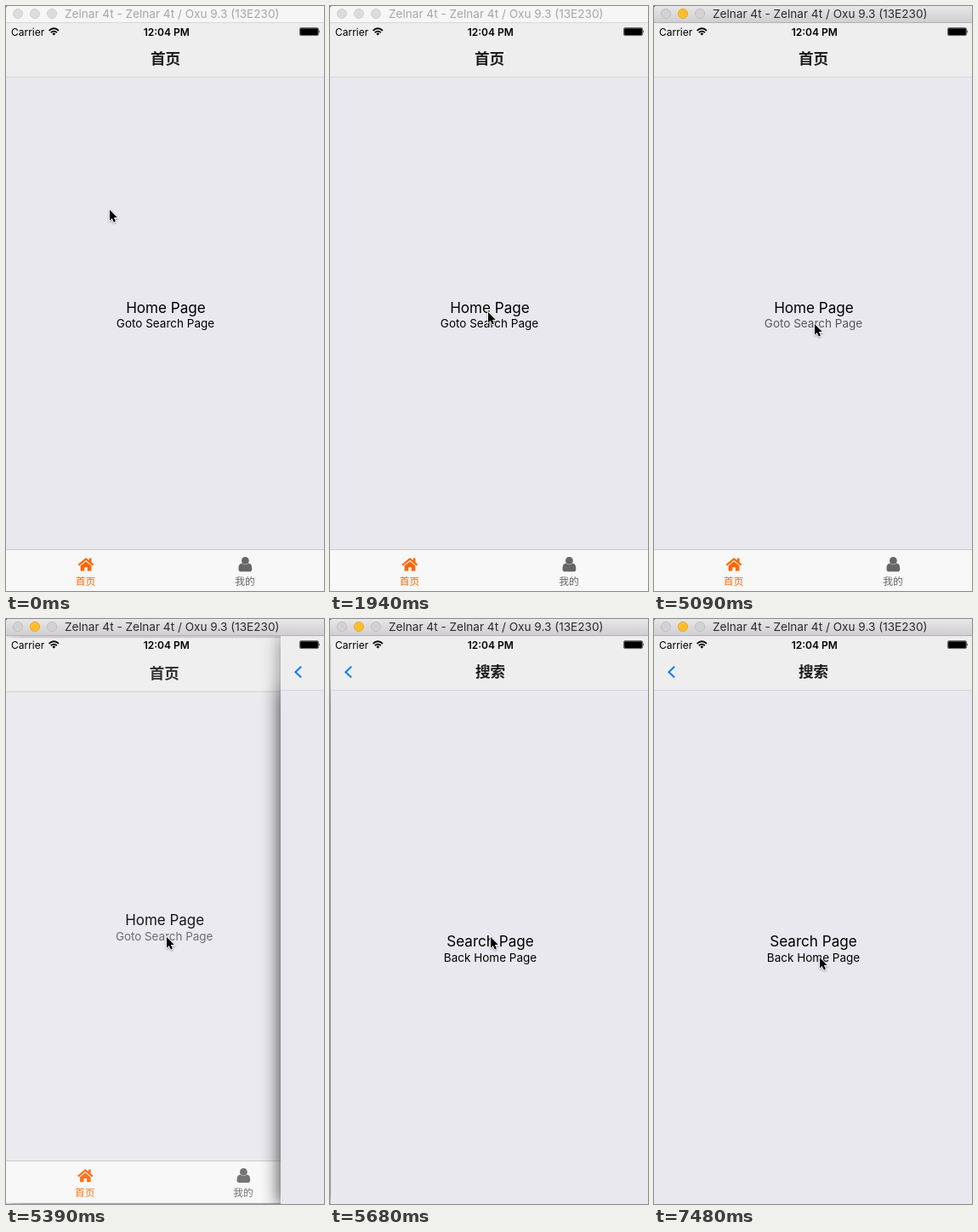
An HTML page for the animation above (8000 ms loop, 374x686 px).

```html
<!DOCTYPE html>
<html lang="zh">
<head>
<meta charset="utf-8">
<style>
  html, body { margin: 0; width: 100%; height: 100%; overflow: hidden; background: #fff; }
  #stage { position: relative; width: 374px; height: 686px; overflow: hidden; }
  #screen { position: absolute; left: 0; top: 20px; width: 374px; height: 666px; overflow: hidden; background: #fff; }
  .card { position: absolute; left: 0; top: 0; width: 374px; height: 667px; background: #e9e8ee; }
  .card, .card::before { box-shadow: 0 0 20px rgba(0,0,0,.46); }
  .card::before { content: ""; position: absolute; z-index: -1; inset: 64px 0 0; }
  svg { display: block; }
  #chrome { position: absolute; left: 0; top: 0; }
  text { font-family: Inter, "Noto Sans CJK SC", "Noto Sans CJK", sans-serif; }
  .mid { text-anchor: middle; }
  .head { font-size: 17.6px; font-weight: 600; fill: #1c1c1e; }
  .big { font-size: 17.1px; }
  .link { font-size: 13.5px; }
  .tab { font-size: 11.8px; }
  .bar { fill: #eeeeef; }
  .rule { fill: #d7d7dc; }
</style>
</head>
<body>
<div id="stage">
  <div id="screen">
    <div class="card" id="home">
      <svg width="374" height="667" viewBox="0 20 374 667">
        <rect class="bar" y="20" width="374" height="63"/>
        <rect class="rule" y="83" width="374" height="1"/>
        <text class="mid head" x="187.5" y="68">首页</text>
        <text class="mid big" x="188" y="359.5">Home Page</text>
        <text class="mid link" id="goto" x="187.5" y="377">Goto Search Page</text>
        <rect y="637" width="374" height="50" fill="#f8f8f8"/>
        <rect y="637" width="374" height="1" fill="#c8c8d0"/>
        <g fill="#ff6600">
          <path d="M85.4 655.6L94 648.4L102.6 655.6" fill="none" stroke="#ff6600" stroke-width="2.2"/>
          <path d="M97.8 647.6h2.7v5.4l-2.7-2.2zM87.6 656.6L94 651.2L100.4 656.6V662.4H95.8V658.2H92.2V662.4H87.6Z"/>
          <text class="mid tab" x="93.5" y="679">首页</text>
        </g>
        <g fill="#666">
          <circle cx="281.4" cy="650.4" r="4.4"/>
          <path d="M277.6 653.6Q281.4 656.8 285.2 653.6C288.4 653.8 289.3 656.8 289.3 660.4Q289.2 663.2 286.6 663.2H276.2Q273.6 663.2 273.5 660.4C273.5 656.8 274.4 653.8 277.6 653.6Z"/>
          <text class="mid tab" x="281" y="679">我的</text>
        </g>
      </svg>
    </div>
    <div class="card" id="search">
      <svg width="374" height="667" viewBox="0 20 374 667">
        <rect class="bar" y="20" width="374" height="63"/>
        <rect class="rule" y="83" width="374" height="1"/>
        <path d="M24.2 55.8L17.4 62.2L24.2 68.6" fill="none" stroke="#0b7df2" stroke-width="2"/>
        <text class="mid head" x="187.5" y="68">搜索</text>
        <text class="mid big" x="187.5" y="384">Search Page</text>
        <text class="mid link" x="187.5" y="401.7">Back Home Page</text>
      </svg>
    </div>
  </div>
  <svg id="chrome" width="374" height="686">
    <defs>
      <linearGradient id="lit" x2="0" y2="1">
        <stop stop-color="#e8e6e8"/><stop offset="1" stop-color="#d0ced0"/>
      </linearGradient>
    </defs>
    <rect id="titlebar" width="374" height="19"/>
    <rect id="edge" y="19" width="374" height="1"/>
    <path d="M0 0h1.5L0 1.5Z" fill="#444"/>
    <g stroke-width="1">
      <circle class="dot" cx="14" cy="9" r="5.6"/>
      <circle class="dot" cx="34" cy="9" r="5.6" id="amber"/>
      <circle class="dot" cx="54" cy="9" r="5.6"/>
    </g>
    <text id="title" x="69" y="14" font-size="13.6">Zelnar 4t - Zelnar 4t / Oxu 9.3 (13E230)</text>
    <text x="6" y="34.5" font-size="12">Carrier</text>
    <g fill="none" stroke="#000" stroke-width="1.8">
      <path d="M50.6 28.8Q56.3 23.6 62 28.8M52.7 31.2Q56.3 28 59.9 31.2"/>
      <path d="M54.4 32.4Q56.3 30.8 58.2 32.4L56.3 34.6Z" fill="#000" stroke="none"/>
    </g>
    <text class="mid" x="188.7" y="34.5" font-size="12" font-weight="600">12:04 PM</text>
    <rect x="345.4" y="25.6" width="22.2" height="9" rx="1.6" fill="none" stroke="#000" stroke-width=".6"/>
    <rect x="346.1" y="26.3" width="20.8" height="7.6" rx=".8"/>
    <path d="M368.4 28.3q1.5 1.7 0 3.4z"/>
    <g id="cursor" style="filter:drop-shadow(0 1px 1px rgba(0,0,0,.35))">
      <path d="M1 1V13.5L3.8 10.9L5.9 15.5L7.9 14.6L5.9 10.1H9.8Z" stroke="#fff" stroke-width="1.6" paint-order="stroke"/>
    </g>
  </svg>
</div>
<script>
const LOOP = 8000, WIDTH = 374, ACTIVE_AT = 5090;
const $ = id => document.getElementById(id);

// [start ms, value...]
const cursorSteps = [
  [0, 121, 238], [1350, 114, 256], [1500, 155, 291], [1650, 168, 302], [1790, 171, 324],
  [1940, 185, 358], [2090, 188, 367], [2240, 188, 371], [2840, 188, 372],
  [7180, 191, 384], [7330, 194, 394], [7480, 194, 396]
];
const pressSteps = [[0, 1], [5090, .62], [5240, .25], [5390, .6], [5540, 1]];
const slideSteps = [[0, WIDTH], [5390, 323], [5540, 80], [5680, 1], [5830, 0]];

const at = (steps, t) => steps.findLast(s => s[0] <= t).slice(1);

function paintWindow(active) {
  $('titlebar').setAttribute('fill', active ? 'url(#lit)' : '#f6f6f6');
  $('edge').setAttribute('fill', active ? '#b4b2b4' : '#d6d6d6');
  $('title').setAttribute('fill', active ? '#2c2c2c' : '#a6a6a6');
  for (const dot of document.querySelectorAll('.dot')) {
    const lit = active && dot.id === 'amber';
    dot.setAttribute('fill', lit ? '#fdbd2d' : active ? '#d3d2d3' : '#dcdcdc');
    dot.setAttribute('stroke', lit ? '#eaae2c' : active ? '#c2c1c2' : '#d4d4d4');
  }
}

function slide(x) {
  const p = 1 - x / WIDTH;
  $('home').style.opacity = 1 - .7 * p;
  $('home').style.transform = `translateX(${-10 * p}px) scale(${1 - .05 * p})`;
  $('search').style.display = p ? 'block' : 'none';
  $('search').style.transform = `translateX(${x}px)`;
}

function draw(t) {
  const [cx, cy] = at(cursorSteps, t);
  $('cursor').setAttribute('transform', `translate(${cx} ${cy})`);
  $('goto').setAttribute('opacity', at(pressSteps, t)[0]);
  paintWindow(t >= ACTIVE_AT);
  slide(at(slideSteps, t)[0]);
}

const start = performance.now();
function tick() {
  draw((performance.now() - start) % LOOP);
  requestAnimationFrame(tick);
}
tick();
</script>
</body>
</html>
```
